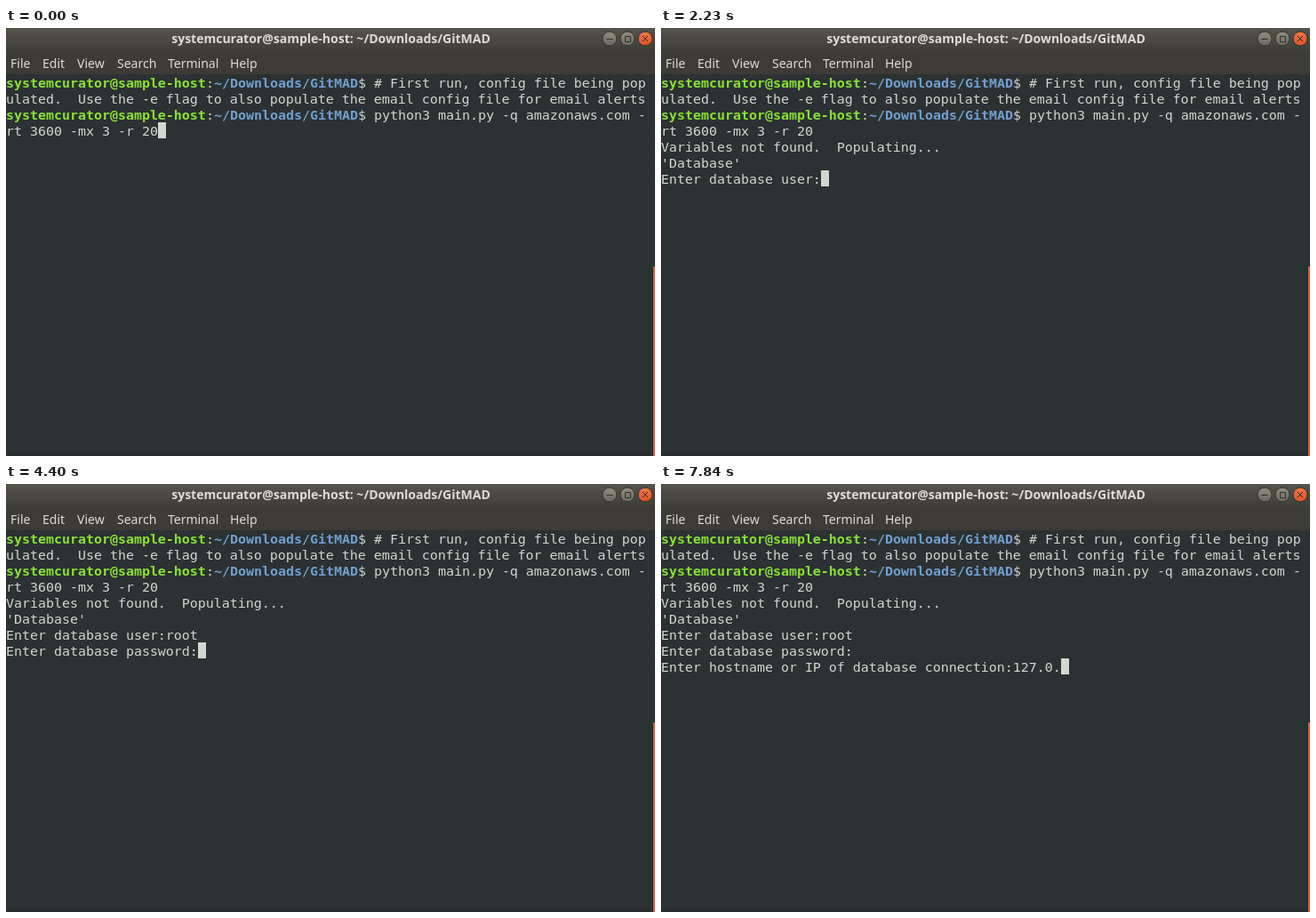
These frames come from a looping animation (730 px wide and 481 px high, 8 s). An HTML page:

```html
<!DOCTYPE html>
<html lang="en">
<head>
<meta charset="utf-8">
<title>Terminal session</title>
<style>
  html, body { margin: 0; width: 100%; height: 100%; overflow: hidden; background: #2c3133; }
  svg { display: block; width: 730px; height: 481px; }
  text { white-space: pre; }
  .ui { font: 14px "Noto Sans", "Open Sans", sans-serif; fill: #dfdbd2; }
  .title { font-weight: 700; text-anchor: middle; }
  .term { font: 14.95px "DejaVu Sans Mono", monospace; fill: #d3d7cf; }
  .term .user { font-weight: 700; fill: #8ae234; }
  .term .path { font-weight: 700; fill: #729fcf; }
</style>
</head>
<body>
<svg id="stage" viewBox="0 0 730 481" xmlns="http://www.w3.org/2000/svg">
  <defs>
    <linearGradient id="bar" x1="0" y1="0" x2="0" y2="1">
      <stop offset="0" stop-color="#57544c"/>
      <stop offset="1" stop-color="#3d3c37"/>
    </linearGradient>
    <linearGradient id="grey" x1="0" y1="0" x2="0" y2="1">
      <stop offset="0" stop-color="#8f8c80"/>
      <stop offset="1" stop-color="#6b695f"/>
    </linearGradient>
    <linearGradient id="orange" x1="0" y1="0" x2="0" y2="1">
      <stop offset="0" stop-color="#f1764a"/>
      <stop offset="1" stop-color="#da4f24"/>
    </linearGradient>
  </defs>
  <rect width="730" height="481" fill="#2c3133"/>
  <rect y="477" width="730" height="4" fill="#292c2f"/>
  <rect y="26" width="730" height="26" fill="#3c3b37"/>
  <rect width="730" height="27" fill="url(#bar)"/>
  <rect x="728" y="268" width="2" height="213" fill="#d9623b"/>
  <g stroke="#33322d">
    <circle cx="679" cy="12" r="8" fill="url(#grey)"/>
    <circle cx="699" cy="12" r="8" fill="url(#grey)"/>
    <circle cx="719" cy="12" r="8" fill="url(#orange)"/>
    <path d="M675.5 12.5h7M696.5 9.5h6v6h-6zM716 9l6 6m0-6l-6 6" fill="none"/>
  </g>
  <g id="chrome" class="ui"></g>
  <g id="screen" class="term"></g>
  <rect id="cursor" width="9" height="18" fill="#d3d7cf"/>
</svg>
<script>
const CELL_W = 9, CELL_H = 18, TOP = 52, BASELINE = 15, LOOP = 8000;
const FIRST_OUTPUT_ROW = 4;
const USER = "systemcurator@sample-host", PATH = "~/Downloads/GitMAD";
const byId = id => document.getElementById(id);
const screen = byId("screen"), chrome = byId("chrome"), cursor = byId("cursor");

function addText(parent, x, y, content, cls = "") {
  const node = document.createElementNS("http://www.w3.org/2000/svg", "text");
  node.setAttribute("x", x);
  node.setAttribute("y", y);
  node.setAttribute("class", cls);
  node.textContent = content;
  parent.appendChild(node);
  return node;
}

const print = (row, col, content, cls) =>
  addText(screen, col * CELL_W, TOP + row * CELL_H + BASELINE, content, cls);

function printPrompt(row, command) {
  let col = 0;
  for (const [part, cls] of [[USER, "user"], [":"], [PATH, "path"], ["$ " + command]]) {
    print(row, col, part, cls);
    col += part.length;
  }
}

addText(chrome, 365.5, 17, `${USER}: ${PATH}`, "title");
const menu = { File: 5, Edit: 41, View: 80, Search: 125, Terminal: 182, Help: 252 };
for (const [label, x] of Object.entries(menu)) addText(chrome, x, 45, label);

const lastCommandLine = "rt 3600 -mx 3 -r 20";
printPrompt(0, "# First run, config file being pop");
print(1, 0, "ulated.  Use the -e flag to also populate the email config file for email alerts");
printPrompt(2, "python3 main.py -q amazonaws.com -");
print(3, 0, lastCommandLine);

const output = [
  "Variables not found.  Populating...",
  "'Database'",
  "Enter database user:",
  "Enter database password:",
  "Enter hostname or IP of database connection:"
];
const answers = { 6: "root" };
const outputNodes = output.map((_, i) => print(FIRST_OUTPUT_ROW + i, 0, ""));

// Each step: start time, cursor row, text typed on that row, cursor visible.
const steps = [
  [0, 3, "", true],
  [220, 3, "", false],
  [820, 3, "", true],
  [1000, 4, "", true],
  [1450, 6, "", true],
  [1600, 6, "", false],
  [2230, 6, "", true],
  [2620, 6, "ro", true],
  [2780, 6, "roo", true],
  [2840, 6, "root", true],
  [3230, 7, "", true],
  [3780, 7, "", false],
  [4400, 7, "", true],
  [5790, 8, "", true],
  [6340, 8, "", false],
  [6810, 8, "1", true],
  [6970, 8, "12", true],
  [7160, 8, "127", true],
  [7440, 8, "127.", true],
  [7600, 8, "127.0", true],
  [7840, 8, "127.0.", true]
];

function lineAt(row, activeRow, typed) {
  if (row < FIRST_OUTPUT_ROW) return lastCommandLine;
  if (row > activeRow || activeRow === FIRST_OUTPUT_ROW) return "";
  const answer = row === activeRow ? typed : answers[row] || "";
  return output[row - FIRST_OUTPUT_ROW] + answer;
}

let shown = null;
function render(time) {
  const step = steps.findLast(([start]) => start <= time);
  if (step === shown) return;
  shown = step;
  const [, row, typed, visible] = step;
  outputNodes.forEach((node, i) => {
    node.textContent = lineAt(FIRST_OUTPUT_ROW + i, row, typed);
  });
  cursor.setAttribute("x", lineAt(row, row, typed).length * CELL_W);
  cursor.setAttribute("y", TOP + row * CELL_H);
  cursor.setAttribute("visibility", visible ? "visible" : "hidden");
}

const startTime = performance.now();
function tick() {
  render((performance.now() - startTime) % LOOP);
  requestAnimationFrame(tick);
}
tick();
</script>
</body>
</html>
```
